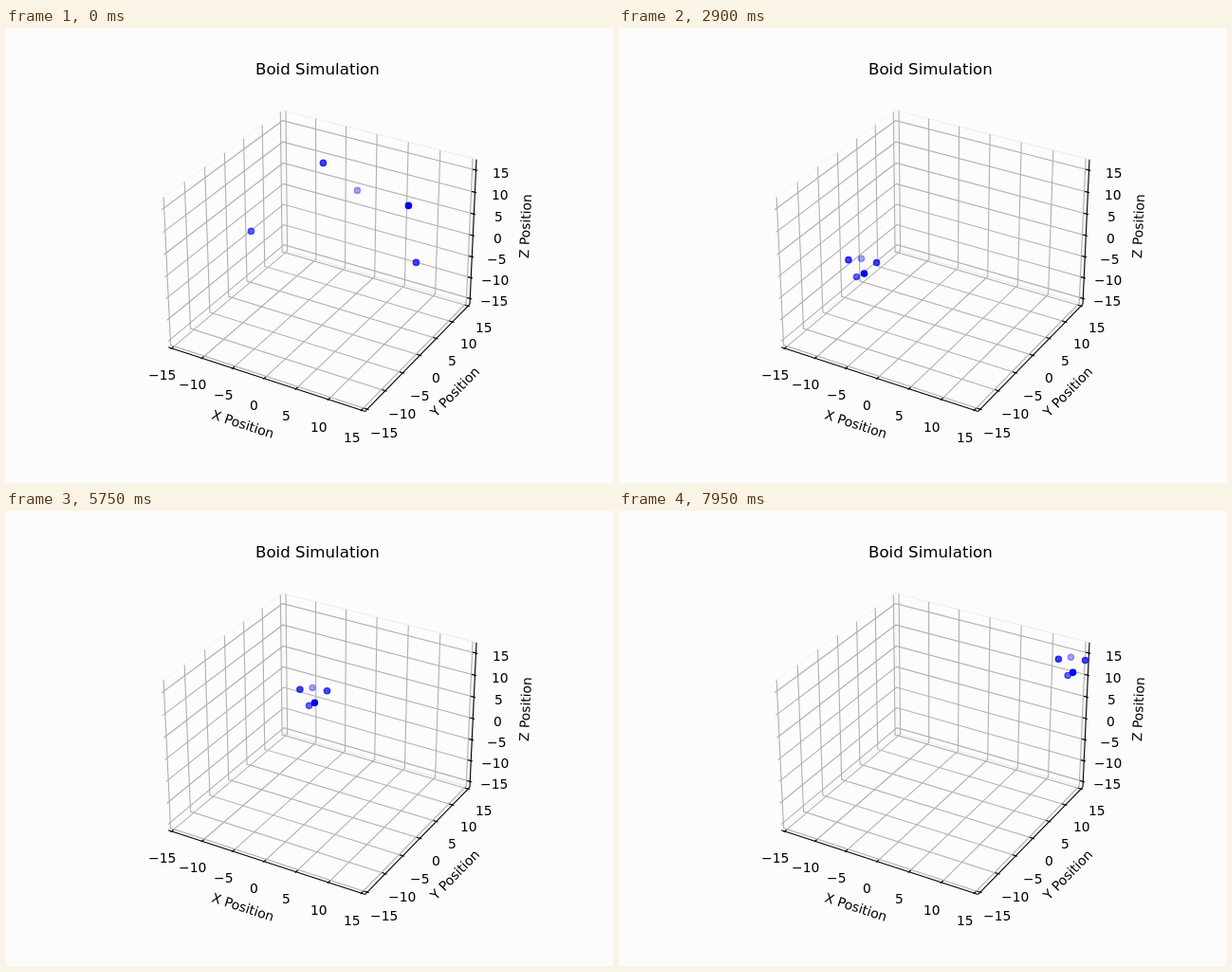
Animation of 640 by 480 pixels, one loop 8000 ms. Source, as an HTML page with a canvas:

```html
<!DOCTYPE html>
<html>
<head>
<meta charset="utf-8">
<style>
  html, body { margin: 0; width: 100%; height: 100%; overflow: hidden; background: #fcfcfc; }
  canvas { display: block; }
</style>
</head>
<body>
<canvas id="stage" width="640" height="480"></canvas>
<script>
const ctx = document.getElementById('stage').getContext('2d');
const LOOP = 8000, STEP = 50, POINT = 100 / 72;
const FONT = '"DejaVu Sans", sans-serif';

// Perspective camera: elevation 30°, azimuth -60°, box aspect 4:4:3.
const ASPECT = [8 / 7, 8 / 7, 6 / 7];
function project(point) {
  const [x, y, z] = point.map((v, i) => v * ASPECT[i]);
  const right = 0.866 * x + 0.5 * y;
  const up = -0.25 * x + 0.433 * y + 0.866 * z;
  const near = 0.433 * x - 0.75 * y + 0.5 * z;
  const scale = 1997.8 / (10 - near);
  return [333 + right * scale, 238 - up * scale];
}

function line(points, color, width = 0.8 * POINT) {
  ctx.strokeStyle = color;
  ctx.lineWidth = width;
  ctx.beginPath();
  points.forEach(p => ctx.lineTo(...project(p)));
  ctx.stroke();
}

function setFont(size) {
  ctx.font = `${size * POINT}px ${FONT}`;
  ctx.fillStyle = '#000';
}

// Horizontal text, centred and snapped to whole pixels.
function label(string, x, baseline, size = 10) {
  setFont(size);
  const left = x - ctx.measureText(string).width / 2;
  ctx.fillText(string, Math.round(left), Math.round(baseline));
}

function axisTitle(string, [x, y], angle) {
  ctx.save();
  ctx.translate(x, y);
  ctx.rotate(angle);
  setFont(10);
  ctx.textAlign = 'center';
  ctx.fillText(string, 0, 4);
  ctx.restore();
}

const E = 25 / 48, LABEL = E + 0.0864, TITLE = E + 0.188;

// at(v, d): point v along the axis line, pushed outwards to distance d.
const axes = [
  { name: 'X', center: 0, range: 29.9,
    at: (v, d) => [v, -d, -d], tick: (v, d) => [v, -d, -E],
    grid: v => [[v, -E, -E], [v, E, -E], [v, E, E]] },
  { name: 'Y', center: 0, range: 29.9,
    at: (v, d) => [d, v, -d], tick: (v, d) => [d, v, -E],
    grid: v => [[E, v, -E], [-E, v, -E], [-E, v, E]] },
  { name: 'Z', center: 0.52, range: 32.4,
    at: (v, d) => [d, d, v], tick: (v, d) => [d, E, v],
    grid: v => [[-E, -E, v], [-E, E, v], [E, E, v]] }
];

function drawPlot() {
  ctx.globalAlpha = 1;
  ctx.fillStyle = '#fcfcfc';
  ctx.fillRect(0, 0, 640, 480);

  line([[-E, -E, -E], [-E, E, -E], [-E, E, E], [-E, -E, E]], 'rgba(242,242,242,.5)', POINT);
  line([[-E, E, -E], [E, E, -E], [E, E, E], [-E, E, E]], 'rgba(229,229,229,.5)', POINT);
  line([[-E, -E, -E], [E, -E, -E], [E, E, -E], [-E, E, -E]], 'rgba(236,236,236,.5)', POINT);

  for (const { name, center, range, at, tick, grid } of axes) {
    for (let value = -15; value <= 15; value += 5) {
      const v = (value - center) / range;
      line(grid(v), '#b0b0b0');
      line([tick(v, E + 1 / 120), tick(v, E - 1 / 60)], '#000');
      const [x, y] = project(at(v, LABEL));
      label(String(value).replace('-', '\u2212'), x, y + 11);
    }
    line([at(-E, E), at(E, E)], '#000');
    const [x1, y1] = project(at(-E, E)), [x2, y2] = project(at(E, E));
    axisTitle(`${name} Position`, project(at(0, TITLE)), Math.atan2(y2 - y1, x2 - x1));
  }
  label('Boid Simulation', 328, 49, 12);
}

// Turning points of the flock's centre.
const path = [
  { t: 0, x: 364, y: 192 }, { t: 850, x: 384, y: 203 }, { t: 1700, x: 372, y: 280 },
  { t: 1950, x: 347, y: 271 }, { t: 2900, x: 255, y: 251 }, { t: 3800, x: 181, y: 217 },
  { t: 4250, x: 191, y: 197 }, { t: 5100, x: 260, y: 193 }, { t: 6400, x: 386, y: 195 },
  { t: 7000, x: 436, y: 191 }, { t: 7950, x: 476, y: 162 }
];

// Place in the flock (dx, dy) and extra distance at the start (farX, farY).
const boids = [
  { dx: 0, dy: -8, farX: 6, farY: -13, alpha: 0.35 },
  { dx: -3, dy: 11, farX: -103, farY: 11, alpha: 0.6 },
  { dx: 15, dy: -5, farX: 53, farY: 60, alpha: 0.72 },
  { dx: -13, dy: -6, farX: -17, farY: -44, alpha: 0.75 },
  { dx: 2, dy: 8, farX: 58, farY: -13, alpha: 1 }
];

// Smooth curve through the turning points.
function flockCenter(time) {
  const last = path.length - 1;
  const i = Math.max(0, path.findIndex(p => p.t > time) - 1);
  const j = time >= path[last].t ? last - 1 : i;
  const a = path[j], b = path[j + 1], span = b.t - a.t;
  const s = (time - a.t) / span;
  const along = key => {
    const slope = k => {
      const p = path[Math.max(k - 1, 0)], n = path[Math.min(k + 1, last)];
      return (n[key] - p[key]) / (n.t - p.t) * span;
    };
    return a[key] + (b[key] - a[key]) * s * s * (3 - 2 * s)
      + slope(j) * s * (1 - s) ** 2 - slope(j + 1) * s * s * (1 - s);
  };
  return { x: along('x') + 0.4, y: along('y') + 0.4 };
}

function drawBoids(time) {
  const center = flockCenter(time);
  const scatter = 1 / (1 + (time / 400) ** 2);
  // The flock is squeezed at the left wall and stretches as it leaves.
  const sinceTurn = (time - 4650) / 900;
  const stretch = Math.sin(sinceTurn * 2.5) * Math.exp(-(sinceTurn ** 2));
  ctx.fillStyle = ctx.strokeStyle = '#00f';
  ctx.lineWidth = POINT;
  for (const { dx, dy, farX, farY, alpha } of boids) {
    const x = center.x + dx * (1 + 0.5 * stretch) + farX * scatter;
    const y = center.y + dy * (1 - 0.5 * stretch) + farY * scatter;
    ctx.globalAlpha = alpha;
    ctx.beginPath();
    ctx.arc(x, y, 3.1, 0, Math.PI * 2);
    ctx.fill();
    ctx.stroke();
  }
}

function frame() {
  const time = Math.floor(performance.now() % LOOP / STEP) * STEP;
  drawPlot();
  drawBoids(time);
  requestAnimationFrame(frame);
}
frame();
</script>
</body>
</html>
```
